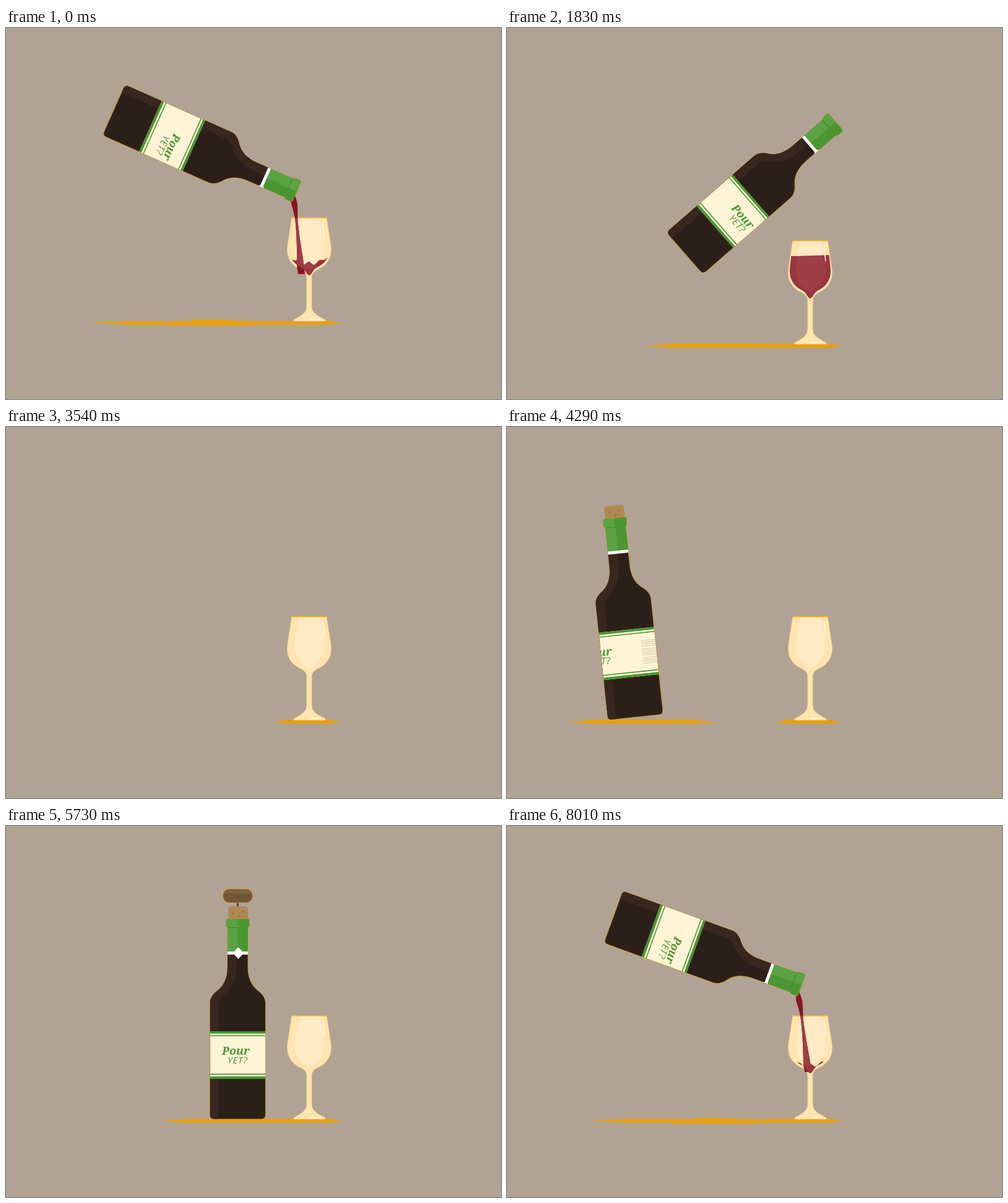
Write an HTML page that moves like this. It is 800 by 600 pixels and loops after 8.04 s.

```html
<!DOCTYPE html>
<html lang="en">
<head>
<meta charset="utf-8">
<title>Pouring wine</title>
<style>
  html, body { margin: 0; width: 100%; height: 100%; overflow: hidden; background: #b0a394; }
  svg { display: block; width: 100vw; height: 100vh; }
</style>
</head>
<body>
<svg viewBox="0 0 800 600" xmlns="http://www.w3.org/2000/svg">
  <defs>
    <path id="bottleShape" d="M-16.5-150V-85C-16.5-62-25-51-35-44C-42-38-45-32-45-25V155Q-45 162-38 162H38Q45 162 45 155V-25C45-32 42-38 35-44C25-51 16.5-62 16.5-85V-150Z"/>
    <path id="facet" d="M473 307H508L514 350C516 371 505 383 490 390C475 383 465 371 467 350Z"/>
    <path id="bowl" d="M462 307H518L523 352C524.5 371 514 382 503 387C496 390 494 400 490 400C486 400 484 390 477 387C466 382 455.5 371 457 352Z"/>
    <path id="stream" d="M467 255H472L471 270Q476 280 476 292V312Q479 340 485 375L488 398H477L475 388Q475 340 472.5 315Q471 300 465 282Z"/>
    <clipPath id="bottleClip"><use href="#bottleShape"/></clipPath>
    <clipPath id="bowlClip"><use href="#bowl"/></clipPath>
    <clipPath id="streamClip"><rect id="streamWindow" x="440" width="80"/></clipPath>
  </defs>
  <rect width="800" height="600" fill="#b0a394"/>
  <g id="shadows" fill="#e5a013"><path id="bottleShadow"/><path id="glassShadow"/></g>

  <g id="glass">
    <path d="M462 307H518L525 352C527.5 372 518 384 505 390C497 394 494 398 494 404V448C494 460 499 463 516 472V474H465V472C481 463 486 460 486 448V404C486 398 483 394 475 390C462 384 452.5 372 455 352Z" fill="#ffe4b0" stroke="#ffd580" stroke-width=".8"/>
    <use href="#facet" fill="#ffeac4"/>
    <path d="M462 307H518" stroke="#f4b52e" stroke-width="1.5"/>
    <path d="M490 471.5H509" stroke="#fffaf0" stroke-width="1.3"/>
  </g>

  <g id="pour" clip-path="url(#streamClip)">
    <use class="flow" href="#stream" fill="#8a141f"/>
    <g clip-path="url(#bowlClip)"><use class="flow" href="#stream" fill="#99353e"/></g>
  </g>
  <g id="wineGroup">
    <g clip-path="url(#bowlClip)"><path id="wine" fill="#99353e"/></g>
    <use href="#facet" fill="#ffeac4" opacity=".05"/>
  </g>
  <path id="shine" d="M512 315L515 340" stroke="#fffaf0" stroke-width="1.5"/>

  <g id="bottle">
    <g id="opener">
      <path id="screw" fill="none" stroke="#5f4722" stroke-width="3"/>
      <g id="handle">
        <rect x="-24" y="-210" width="48" height="22" rx="10" fill="#725638" stroke="#dc9a1d" stroke-width=".8"/>
        <path d="M-23-203Q-21-209-14-209.5H14Q21-209 23-203Z" fill="#80623f"/>
      </g>
    </g>
    <g id="cork">
      <path d="M-14-140L-15.5-177Q-15-182-11-182H12Q16.5-182 17-177L15.5-140Z" fill="#af8955"/>
      <path d="M-8-171h.1M2-166h.1M9-174h.1M-4-154h.1" stroke="#98713f" stroke-width="3" stroke-linecap="round"/>
    </g>
    <use href="#bottleShape" fill="#2b2019" stroke="#d99a1e" stroke-width=".8"/>
    <g clip-path="url(#bottleClip)">
      <path d="M-20-110H-2V-85C-2-60-12-48-22-39C-29-33-31-27-31-20V162H-50V-60Z" fill="#38271f"/>
      <path d="M-17-150H17V-109H-17Z" fill="#4a9632"/>
      <path d="M-17-150H0V-109H-17Z" fill="#5ba245"/>
      <path d="M-17-109H17V-104H-17Z" fill="#fff"/>
      <path id="diamond" d="M1-116L10-106.5L1-97L-8-106.5Z" fill="#fff"/>
      <path d="M-45 20H45V97H-45Z" fill="#fdf3d5"/>
      <path d="M-45 20H45V23.7H-45ZM-45 26.4H45V28H-45ZM-45 88.6H45V90.2H-45ZM-45 93H45V97H-45Z" fill="#4a9632"/>
      <g id="print" fill="#4a9632" text-anchor="middle">
        <text x="-3" y="58" font-family="'Noto Serif', serif" font-size="18" font-weight="700" font-style="italic">Pour</text>
        <text x="0" y="71.5" font-family="'Open Sans', sans-serif" font-size="15" font-style="italic" letter-spacing=".8">YET?</text>
        <path id="smallPrint" stroke="#d8ceb2" stroke-width="1.2"/>
      </g>
    </g>
    <rect x="-19" y="-162" width="38" height="14" rx="3" fill="#4a9632" stroke="#c39a22" stroke-width=".6"/>
    <path d="M0-161.5H-16Q-18.5-161.5-18.5-159V-151Q-18.5-148.5-16-148.5H0Z" fill="#5ba245"/>
    <path d="M-16.5-147.5H16.5" stroke="#3f842a" stroke-width="1.2"/>
    <g id="drops" fill="#e8a91f"><circle/><circle/><circle/><circle/></g>
  </g>
</svg>
<script>
const LOOP = 8040, SWAP = 3090, TIP = 6500;
const { sin, cos, abs, min, max, sqrt, PI } = Math;
const $ = id => document.getElementById(id);
const show = (id, on) => $(id).setAttribute('display', on ? 'inline' : 'none');
const move = (id, x, y) => $(id).setAttribute('transform', `translate(${x} ${y})`);

const mix = (a, b, u) => a + (b - a) * u;
const ramp = (t, a, b) => min(1, max(0, (t - a) / (b - a)));
const smooth = (t, a, b) => { const u = ramp(t, a, b); return u * u * (3 - 2 * u); };
const easeOut = (t, a, b) => 1 - (1 - ramp(t, a, b)) ** 3;

const REST = { x: 374.5, y: 312, angle: 0 };
const POUR = { x: 322, y: 198.5, angle: 114 };
const SETTLED = { x: 372.3, y: 315, angle: -1 };

// Swing between two poses on a bowed path
function swing(from, to, u, bowX, bowY) {
  return {
    x: mix(from.x, to.x, u) + bowX * sin(PI * u),
    y: mix(from.y, to.y, u) - bowY * sin(PI * u),
    angle: mix(from.angle, to.angle, u)
  };
}

// Bottle pose, label turn and the shadow below
function bottleAt(t) {
  if (t < SWAP) {
    const spread = 1 - smooth(t, 600, 2450);
    return { ...swing(POUR, SETTLED, smooth(t, 640, 2830), 60, 44.5), turn: 20, cx: 374 - 39 * spread, half: 125 + 72 * spread };
  }
  if (t < TIP) {
    const lean = sin(PI * ramp(t, 3450, 4860));
    const x = mix(-140, REST.x, smooth(t, 3450, 4860));
    return { x, y: REST.y - 4 * lean, angle: -6.3 * lean, turn: (x - REST.x) * .253, cx: x + 30 * lean, half: 123 };
  }
  const u = smooth(t, 6962, 8145), spread = easeOut(t, 6850, LOOP);
  return { ...swing(REST, POUR, u, 43 * (1 - u), 48 * (1 - u)), turn: 21 * sqrt(u), cx: 374 - 39 * spread, half: 125 + 72 * spread };
}

// Flat puddle with thin tips; wide ones gain a thicker middle
function shadowPath(cx, half) {
  const bar = (w, top, bottom) => {
    const slant = min(8, w * .1), l = cx - w, r = cx + w;
    return `M${l} 477L${l + slant} ${top}H${r - slant}L${r} 477L${r - slant} ${bottom}H${l + slant}Z`;
  };
  const core = half > 150 ? bar(half * .37, 476, 481.5) + bar(half * .19, 472, 478) : '';
  return bar(half, 476, 477.8) + bar(half * .9, 475, 478.8) + bar(half * .79, 473.5, 480) + core;
}

function winePath(time) {
  const level = 331 + 50 * (1 - ramp(time, 0, 1300)) ** 1.5 + max(0, -time) * .22;
  const surge = 1 - smooth(time, 0, 1300);
  let d = 'M452 404';
  for (let x = 452; x <= 528; x += 2) {
    const k = (x - 490) / 32;
    const ripple = 3 * sin(x * .35 + time * .012) * max(0, 1 - k * k);
    d += `L${x} ${(level - k - surge * (11 * k * k + ripple)).toFixed(2)}`;
  }
  return d + 'L528 404Z';
}

function screwPath(turn) {
  let d = 'M0-190V-176';
  for (let i = 0; i <= 30; i++) d += `L${(3.5 * sin(i * .75 + turn) * min(1, i / 4)).toFixed(2)} ${i - 176}`;
  return d;
}

let lines = '';
for (let i = 0; i < 12; i++) lines += `M68 ${40 + 14 * (i >> 2) + 3 * (i & 3)}h30`;
$('smallPrint').setAttribute('d', lines);

function drawOpener(t) {
  const closed = t >= SWAP && t < 6800;
  const pull = -37 * smooth(t, 5950, 6480) - 260 * ramp(t, 6500, 6800) ** 2;
  const turn = ramp(t, 4700, 5650) * PI * 4;
  show('cork', closed);
  show('opener', closed && t > 4600);
  move('cork', 0, pull);
  move('opener', 0, pull - 200 * (1 - easeOut(t, 4600, 5650)));
  $('handle').setAttribute('transform', `scale(${max(.42, abs(cos(turn)))} 1)`);
  $('screw').setAttribute('d', screwPath(turn));

  show('drops', t > 6520 && t < 7290);
  const rise = easeOut(t, 6520, 7170);
  [...$('drops').children].forEach((drop, i) => {
    drop.setAttribute('cx', (i % 2 ? 4 : -12) * rise);
    drop.setAttribute('cy', -162 - (i < 2 ? 27.5 : 11.5) * rise);
    drop.setAttribute('r', 2.5 - 1.6 * rise);
  });
}

function drawPour(time, bottle) {
  const head = 262 + 138 * ramp(time, -160, -40);
  const tail = 255 + 145 * ramp(time, 880, 1060) ** 1.5;
  const mouth = time < 880 ? bottle.x + 162 * sin(bottle.angle * PI / 180) - 474.6 : 0;
  const lean = .03 * sin(-time * PI / 120);
  show('pour', time > -160 && time < 1060);
  $('streamWindow').setAttribute('y', tail);
  $('streamWindow').setAttribute('height', max(0, head - tail));
  for (const flow of document.querySelectorAll('.flow')) {
    flow.setAttribute('transform', `matrix(1 0 ${lean} 1 ${mouth - 270 * lean} 0)`);
  }
  show('wineGroup', time > -50 && time < SWAP);
  $('wine').setAttribute('d', winePath(time));
}

function draw(t) {
  const leaving = t < SWAP;
  const fall = leaving ? 253 * (max(0, t - 861) / 1839) ** 3 : 0;
  const glassY = leaving ? fall : -490 * (1 - easeOut(t, SWAP, 3400));
  const bottle = bottleAt(t);

  $('bottle').setAttribute('transform', `translate(${bottle.x} ${bottle.y + fall}) rotate(${bottle.angle})`);
  move('print', bottle.turn, 0);
  move('diamond', bottle.turn, 0);
  for (const id of ['glass', 'wineGroup', 'shine']) move(id, 0, glassY);

  move('shadows', 0, fall);
  $('bottleShadow').setAttribute('d', shadowPath(bottle.cx, bottle.half));
  $('glassShadow').setAttribute('d', shadowPath(487.5, 54.5 * (leaving ? 1 : ramp(t, SWAP, 3400))));

  drawOpener(t);
  drawPour(t > TIP ? t - LOOP : t, bottle);
}

const start = performance.now();
function tick(now) {
  draw(max(0, now - start) % LOOP);
  requestAnimationFrame(tick);
}
draw(0);
requestAnimationFrame(tick);
</script>
</body>
</html>
```
